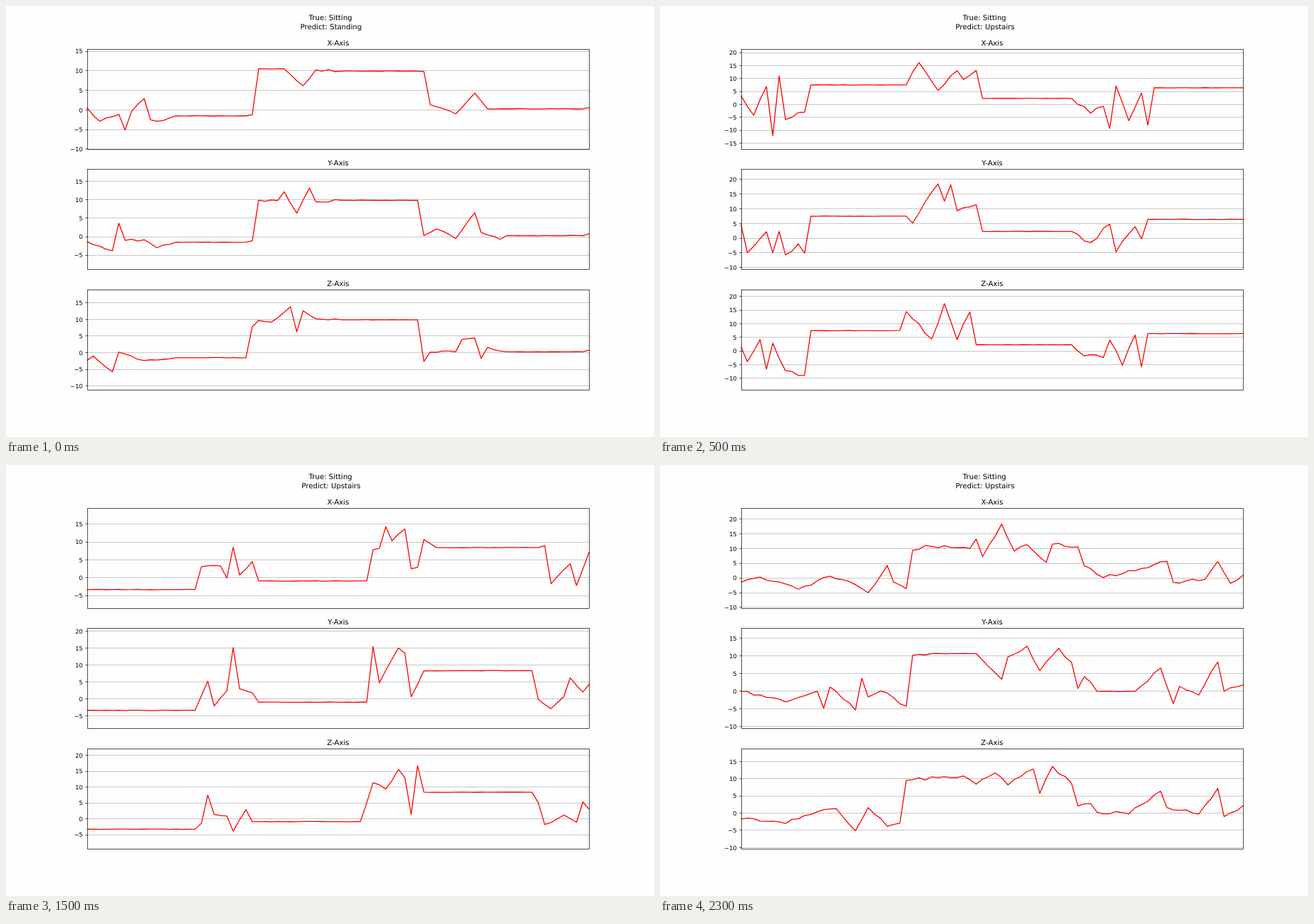
Animation of 917x611 px, one loop 2.5 s. Source, as an HTML page:

```html
<!DOCTYPE html>
<html lang="en">
<head>
<meta charset="utf-8">
<title>Activity prediction</title>
<style>
  html, body { margin: 0; width: 100%; height: 100%; overflow: hidden; background: #fefefe; }
  svg { display: block; }
  text { font-family: "DejaVu Sans", sans-serif; font-size: 10.19px; text-anchor: middle; text-rendering: geometricPrecision; }
  .tick { font-size: 8.49px; text-anchor: end; }
  .frame, .mark { fill: none; stroke: #000; stroke-width: .7; }
  .grid { stroke: #b0b0b0; stroke-width: .7; }
  .line { fill: none; stroke: #f00; stroke-width: 1.3; stroke-linejoin: round; }
</style>
</head>
<body>
<svg id="stage" width="917" height="611" viewBox="0 0 917 611"></svg>
<script>
const HOLD = 500, SAMPLES = 80;
const LEFT = 115.5, RIGHT = 825.5, HEIGHT = 142;
const START = 114.6, STEP = 710.7 / (SAMPLES - 1);
const TREMOR = 0.12;
const PANELS = [['X-Axis', 61.5], ['Y-Axis', 231.5], ['Z-Axis', 402.5]];

// rest: steady stretches shared by all axes, as sample: value
// rough: size of the random swing between unequal key points
const scenes = [
  { guess: 'Standing', rough: 0.6,
    rest: { 14: -1.5, 25: -1.5, 40: 9.9, 52: 9.9, 66: 0.3, 78: 0.3 },
    axes: [
      { lo: -10.09, hi: 15.45, keys: { 0: 0.6, 2: -2.9, 5: -1.1, 6: -5.1, 7: -0.4, 9: 2.9, 10: -2.5, 12: -2.7,
        26: -1.2, 27: 10.5, 31: 10.5, 34: 6.2, 36: 10.2, 53: 9.8, 54: 1.3, 58: -1, 61: 4.3, 63: 0.3, 79: 0.6 } },
      { lo: -8.89, hi: 18.31, keys: { 0: -1.3, 4: -3.8, 5: 3.7, 6: -1, 9: -0.8, 11: -3,
        26: -1.1, 27: 9.9, 30: 9.8, 31: 12.2, 33: 6.4, 35: 13.2, 36: 9.5, 53: 0.3, 55: 2.1, 58: -0.5, 61: 6.5, 62: 1.2, 65: -0.7, 79: 0.8 } },
      { lo: -11.22, hi: 18.86, keys: { 0: -2.3, 1: -1, 4: -5.7, 5: 0.2, 8: -2, 11: -2.2,
        26: 7.8, 27: 9.7, 29: 9.2, 32: 13.8, 33: 6.3, 34: 12.6, 36: 10.2, 53: -2.6, 54: 0.2, 58: 0.3, 59: 4, 61: 4.4, 62: -1.7, 63: 1.6, 79: 0.8 } }
    ] },
  { guess: 'Upstairs', rough: 1.5,
    rest: { 11: 7.5, 24: 7.5, 38: 2.3, 52: 2.3, 65: 6.4, 79: 6.4 },
    axes: [
      { lo: -17.43, hi: 21.24, keys: { 0: 3.4, 2: -4.2, 4: 6.9, 5: -12.1, 6: 11, 7: -5.8, 10: -3,
        26: 7.5, 28: 16.1, 31: 5.4, 34: 13, 35: 9.6, 37: 13.1, 55: -3.4, 57: -0.7, 58: -9.3, 59: 7.1, 61: -6.3, 63: 4.4, 64: -8 } },
      { lo: -10.67, hi: 23.46, keys: { 0: 4.6, 1: -4.9, 4: 2.2, 5: -5, 6: 2.3, 7: -5.7, 9: -1.9, 10: -5.1,
        26: 7.5, 27: 5.1, 31: 18.5, 32: 12.6, 33: 18.2, 34: 9.3, 37: 11.4, 55: -1.5, 58: 4.8, 59: -4.7, 62: 3.9, 63: -0.2, 64: 6.4 } },
      { lo: -14.35, hi: 22.44, keys: { 0: 1.5, 1: -3.9, 3: 4.2, 4: -6.7, 5: 2.9, 7: -7.2, 10: -8.9,
        25: 7.6, 26: 14.5, 30: 4.4, 32: 17.4, 34: 4.2, 36: 14.3, 37: 2.3, 54: -1.8, 57: -2.4, 58: 4, 60: -5.2, 62: 5.9, 63: -5.8, 64: 6.4 } }
    ] },
  { guess: 'Walking', rough: 0.8,
    rest: { 0: 5.5, 16: 5.5, 27: 2.5, 44: 2.5, 54: 8.2, 70: 8.2 },
    axes: [
      { lo: -8.43, hi: 18.88, keys: { 18: 5.5, 19: 4.9, 20: 13.1, 21: 4.1, 22: 11.3, 24: 4.4, 25: -2.9, 26: 3.6,
        45: 10.9, 46: 6.5, 47: 9, 48: 6.5, 50: 14.4, 51: 6.6, 52: 6.2, 53: 15, 71: 8.2, 72: -0.6, 75: -4.3, 76: 0.1, 79: -4.5 } },
      { lo: -10.1, hi: 22.22, keys: { 17: 5.5, 18: 8.3, 19: 5.3, 22: 8.9, 23: 14.4, 24: 1.8, 25: 5.9, 26: 2.2,
        45: 12, 46: 6.6, 48: 3.8, 50: 18.3, 51: 4.2, 52: 10.2, 71: 8.2, 72: -4.8, 75: -1.7, 76: -6.1, 77: -0.9, 79: 1.5 } },
      { lo: -7.38, hi: 23.16, keys: { 17: 5.5, 18: -0.9, 19: 10.5, 20: 2.5, 21: 10.9, 23: 6.5, 24: -2, 25: 19.6, 26: 2.5,
        45: 11, 46: 4.1, 47: 7.9, 49: 3.7, 50: 10.3, 51: 2.5, 52: 7.5, 72: -3, 75: 0.5, 76: 6.8, 77: -1, 78: 6.9, 79: -0.6 } }
    ] },
  { guess: 'Upstairs', rough: 0.8,
    rest: { 0: -3.3, 17: -3.3, 27: -0.9, 43: -0.9, 55: 8.4, 70: 8.4 },
    axes: [
      { lo: -8.6, hi: 19.35, keys: { 18: 3.1, 21: 3.3, 22: -0.1, 23: 8.5, 24: 0.8, 26: 4.5,
        44: -0.9, 45: 7.8, 46: 8.2, 47: 14.2, 48: 10.3, 50: 13.6, 51: 2.5, 52: 2.9, 53: 10.7, 71: 8.4, 72: 9, 73: -1.7, 76: 3.9, 77: -2.2, 79: 7.2 } },
      { lo: -8.66, hi: 20.92, keys: { 19: 5.3, 20: -2, 22: 2.4, 23: 15.2, 24: 3.1, 26: 1.9,
        44: -0.9, 45: 15.5, 46: 4.8, 49: 15.1, 50: 13.6, 51: 0.7, 53: 8.4, 71: -0.1, 73: -2.8, 75: 0.7, 76: 6.3, 78: 2.1, 79: 4.4 } },
      { lo: -9.56, hi: 22.07, keys: { 18: -1.4, 19: 7.5, 20: 1.4, 22: 0.9, 23: -3.9, 25: 2.9, 26: -0.9,
        45: 11.4, 47: 9.4, 49: 15.6, 50: 13, 51: 1.4, 52: 16.8, 53: 8.4, 71: 5, 72: -1.8, 75: 1.2, 77: -1.1, 78: 5.3, 79: 3 } }
    ] },
  { guess: 'Upstairs', rough: 1,
    rest: {},
    axes: [
      { lo: -10.38, hi: 23.59, keys: { 0: -1.5, 3: 0.3, 9: -3.8, 14: 0.6, 17: -1.2, 20: -5, 23: 4.2, 24: -1.4, 26: -3.6,
        27: 9.4, 29: 11, 36: 10, 37: 13.2, 38: 7.2, 41: 18.3, 43: 9.1, 45: 11.3, 48: 5.3, 49: 11.5, 53: 10.5,
        54: 4.1, 57: 0.1, 67: 5.6, 68: -1.5, 73: -0.5, 75: 5.6, 77: -1.8, 79: 0.9 } },
      { lo: -10.64, hi: 17.76, keys: { 0: -0.1, 7: -3.1, 12: -0.1, 13: -4.9, 14: 1.1, 18: -5.4, 19: 3.6, 20: -1.7, 22: 0, 26: -4.3,
        27: 10.1, 30: 10.6, 37: 10.6, 41: 3.3, 42: 9.7, 45: 12.7, 47: 5.8, 50: 12.1, 52: 8.1,
        53: 0.7, 54: 4.1, 56: -0.1, 62: -0.1, 66: 6.5, 68: -3.6, 69: 1.3, 72: -1.2, 75: 8.2, 76: -0.1, 79: 1.7 } },
      { lo: -10.45, hi: 18.65, keys: { 0: -1.7, 7: -3, 12: 0.4, 15: 1.3, 18: -5.1, 20: 1.6, 23: -3.8, 25: -2.9,
        26: 9.5, 35: 10.8, 37: 8.4, 40: 11.7, 42: 8.2, 46: 12.8, 47: 5.7, 49: 13.6, 52: 8.6,
        53: 2.1, 55: 2.8, 56: 0.3, 61: -0.2, 66: 6.4, 67: 1.6, 72: -0.3, 75: 7.2, 76: -1, 79: 2.2 } }
    ] }
];

function random(seed) {
  let s = seed * 7919 + 17;
  return () => (s = (s * 16807) % 2147483647) / 2147483647;
}

// Straight runs between key points, with seeded noise on the samples inside
function signal(keys, rough, seed) {
  const rand = random(seed);
  const marks = Object.keys(keys).map(Number);
  const out = [keys[marks[0]]];
  for (let m = 1; m < marks.length; m++) {
    const a = marks[m - 1], b = marks[m];
    const swing = keys[a] === keys[b] ? TREMOR : rough;
    for (let i = a + 1; i < b; i++) {
      const line = keys[a] + (keys[b] - keys[a]) * (i - a) / (b - a);
      out.push(line + (rand() - 0.5) * swing);
    }
    out.push(keys[b]);
  }
  return out;
}

const text = (x, y, str, cls = '') => `<text class="${cls}" x="${x}" y="${y}">${str}</text>`;
const rule = (x1, x2, y, cls) => `<path class="${cls}" d="M${x1} ${y}H${x2}"/>`;

function drawPanel([name, top], { lo, hi }, values) {
  const toY = v => top + (hi - v) / (hi - lo) * HEIGHT;
  let out = '';
  for (let v = Math.ceil(lo / 5) * 5; v <= hi; v += 5) {
    const y = toY(v);
    const row = Math.floor(y) + 0.5;
    out += rule(LEFT, RIGHT, row, 'grid') + rule(LEFT - 3, LEFT, row, 'mark');
    out += text(108.7, (y + 3.2).toFixed(1), String(v).replace('-', '\u2212'), 'tick');
  }
  const points = values.map((v, i) => `${(START + i * STEP).toFixed(2)},${toY(v).toFixed(2)}`);
  out += `<polyline class="line" points="${points.join(' ')}"/>`;
  out += `<rect class="frame" x="${LEFT}" y="${top}" width="${RIGHT - LEFT}" height="${HEIGHT}"/>`;
  return out + text(470, top - 5.3, name);
}

function drawScene({ guess, rough, rest, axes }, n) {
  const panels = axes.map((axis, k) =>
    drawPanel(PANELS[k], axis, signal({ ...rest, ...axis.keys }, rough, n * 3 + k + 1)));
  return text(459.2, 20.3, 'True: Sitting') + text(460, 33.2, 'Predict: ' + guess) + panels.join('');
}

const stage = document.getElementById('stage');
let shown = -1;

function update() {
  const now = Math.floor(performance.now() / HOLD) % scenes.length;
  if (now !== shown) {
    shown = now;
    stage.innerHTML = drawScene(scenes[now], now);
  }
  requestAnimationFrame(update);
}
update();
</script>
</body>
</html>
```
